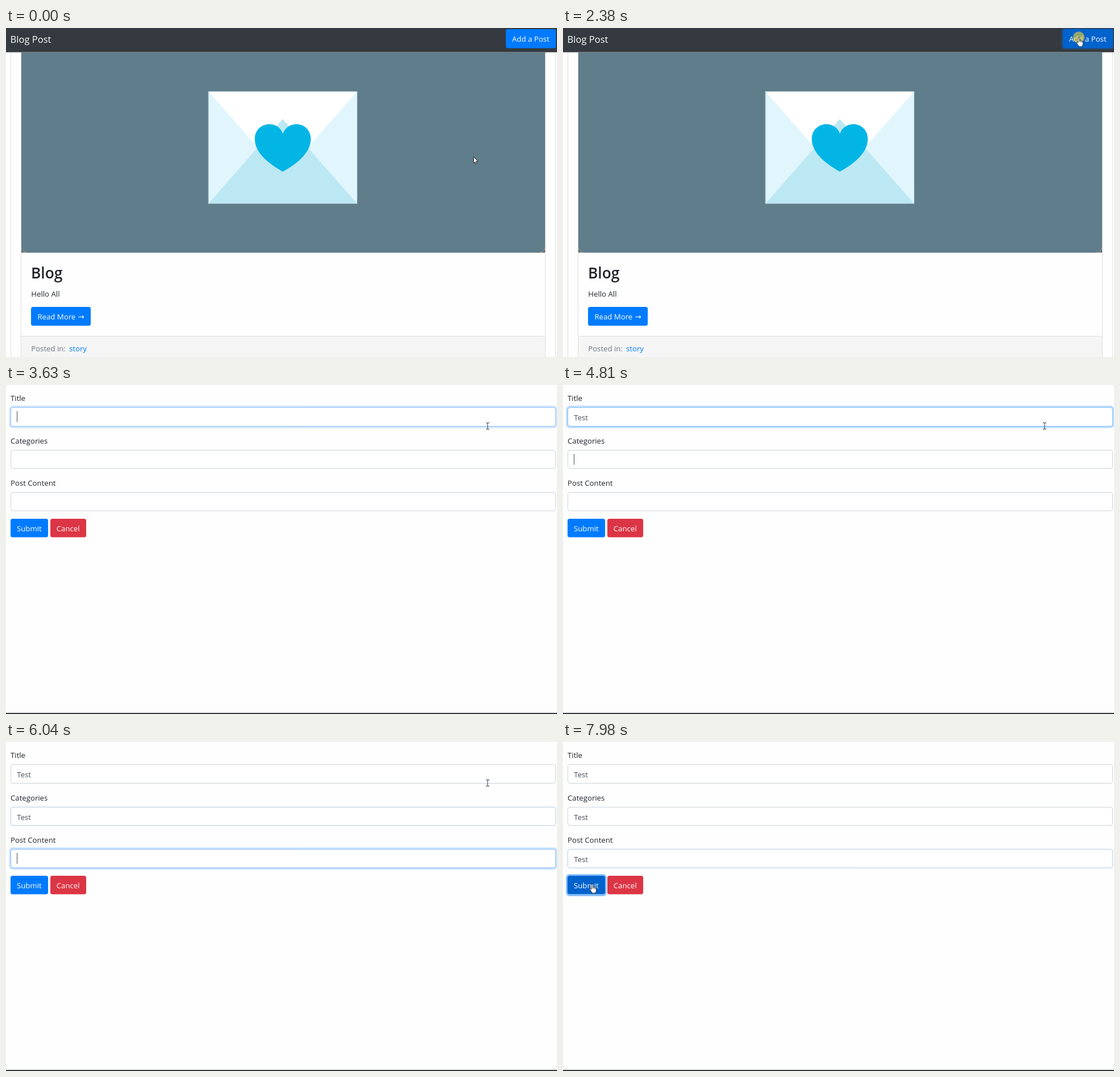
An HTML page that plays this animation: 969 px wide and 578 px high, repeating every 8 s.

```html
<!DOCTYPE html>
<html lang="en">
<head>
<meta charset="utf-8">
<title>Blog post form</title>
<style>
  html, body { margin: 0; width: 100%; height: 100%; overflow: hidden; background: #fefefe; }
  svg { display: block; width: 100%; height: 100%; }
  text { font: 13.2px "Open Sans", "Noto Sans", sans-serif; fill: #212529; white-space: pre; }
  .brand { font-size: 16.5px; fill: #fff; }
  .head { font-size: 26.3px; font-weight: 600; }
  .light { fill: #fff; }
  .value { fill: #495057; }
  .muted { fill: #6c757d; }
  .link { fill: #007bff; }
  .arrow { font-family: "DejaVu Sans", sans-serif; }
  .btn { fill: #007bff; }
  .line { fill: none; stroke: #dfdfdf; }
  .box { fill: #fff; stroke: #ced4da; }
  .ring { fill: none; stroke: #007bff; stroke-width: 2.7; }
</style>
</head>
<body>
<svg viewBox="0 0 969 578" preserveAspectRatio="none">
  <rect width="969" height="578" fill="#fefefe"/>

  <g id="form">
    <g id="fields"></g>
    <rect id="submitRing" class="ring" x="6.7" y="233.7" width="68.6" height="35.6" rx="4.5" stroke-opacity=".5" opacity="0"/>
    <rect id="submit" class="btn" x="8" y="235" width="66" height="32.6" rx="3.5"/>
    <text class="light" x="19" y="256.5">Submit</text>
    <rect x="78" y="235" width="63" height="32.6" rx="3.5" fill="#dc3545"/>
    <text class="light" x="88.8" y="256.5">Cancel</text>
    <rect y="576" width="969" height="2" fill="#343a40"/>
  </g>

  <g id="blog">
    <rect width="969" height="578" fill="#fefefe"/>
    <path class="line" d="M8.5 43V578M966.5 43V578M26.5 43V578M948.5 43V578"/>
    <path d="M27 380H948V394.5H27Z" fill="#56666e"/>
    <path d="M27 43H948V384Q948 394.5 937 394.5H38Q27 394.5 27 384Z" fill="#607d8b"/>
    <path d="M27 384Q27 394.5 38 394.5M948 384Q948 394.5 937 394.5" fill="none" stroke="#a39c92"/>
    <g>
      <rect x="356" y="111.5" width="261.5" height="197" fill="#e1f5fc"/>
      <path d="M356 111.5H617.5L486.75 260Z" fill="#fff"/>
      <path d="M356 308.5H617.5L486.75 160Z" fill="#bce8f3"/>
      <rect x="356" y="111.5" width="261.5" height="197" fill="none" stroke="#a4c4cf"/>
      <path d="M487 252.5C478 247 437.5 226 437.5 195C437.5 178 451 169 463 169C475 169 484 176 487 186C490 176 499 169 511 169C523 169 536 178 536 195C536 226 496 247 487 252.5Z" fill="#03b5e5"/>
    </g>
    <text class="head" x="44" y="439.5">Blog</text>
    <text x="44.3" y="471.5">Hello All</text>
    <rect class="btn" x="44" y="490" width="105" height="33" rx="3.5"/>
    <text class="light" x="55.4" y="512">Read More</text>
    <text class="light arrow" x="126.5" y="512">→</text>
    <rect x="27" y="541" width="921" height="37" fill="#f5f5f5"/>
    <path class="line" d="M27 541.5H948"/>
    <text class="muted" x="44.2" y="567.5">Posted in:</text>
    <text class="link" x="111" y="567.5">story</text>
    <rect width="969" height="42.6" fill="#343a40"/>
    <text class="brand" x="7.6" y="25.7">Blog Post</text>
    <rect id="addRing" class="ring" x="877.7" y=".7" width="90.6" height="35.6" rx="4.5" stroke-opacity=".5" opacity="0"/>
    <rect id="add" class="btn" x="879" y="2" width="88" height="33.4" rx="3.5"/>
    <text class="light" x="890" y="24">Add a Post</text>
  </g>

  <circle id="click" r="10.3" fill="#ffd92e" opacity="0"/>
  <g id="cursor">
    <path id="arrow" d="M.3 .3V11.4L2.8 9.1L4.5 13L6.4 12.2L4.7 8.4H8Z" fill="#fff" stroke="#111" stroke-width=".9"/>
    <path id="hand" d="M-1.2 9.5V1.2Q-1.2 .2 0 .2Q1.3 .2 1.3 1.4V5.2Q3.4 4.6 3.8 5.9Q5.6 5.4 6 6.6Q7.6 6.3 7.6 8V11.5Q7.3 13.3 6.3 14.4V16H-.2V14.6Q-2.2 12.4-3.9 9.6Q-4.5 8.3-3.4 7.9Q-2.4 7.7-1.2 9.5ZM1.3 5.2V8.3M3.8 5.9V8.5M6 6.6V8.8" fill="#fff" stroke="#222" stroke-width=".9"/>
    <path id="beam" d="M-3-5.5H-1Q0-5.5 0-4.5Q0-5.5 1-5.5H3M-3 5.5H-1Q0 5.5 0 4.5Q0 5.5 1 5.5H3M0-4.5V4.5" fill="none" stroke="#333"/>
  </g>
</svg>
<script>
const LOOP = 8000;
const $ = id => document.getElementById(id);

// Hold each value from its time until the next entry.
function hold(el, prop, steps) {
  const frames = steps.map(([t, v]) => ({ offset: t / LOOP, [prop]: v, easing: 'steps(1, end)' }));
  frames.push({ offset: 1, [prop]: steps[steps.length - 1][1] });
  el.animate(frames, { duration: LOOP, iterations: Infinity });
}

function add(parent, tag, attrs, label = '') {
  const el = document.createElementNS('http://www.w3.org/2000/svg', tag);
  for (const k in attrs) el.setAttribute(k, attrs[k]);
  el.textContent = label;
  parent.append(el);
  return el;
}

const fields = [
  { label: 'Title', y: 39.5, h: 33, caret: [3560, 4090], typed: 4340,
    ring: [[0, 0], [3630, .75], [3710, 1], [4870, .2], [4960, 0]] },
  { label: 'Categories', y: 114.5, h: 32, caret: [4810, 5350], typed: 5500,
    ring: [[0, 0], [4870, .75], [4960, 1], [6040, .13], [6110, 0]] },
  { label: 'Post Content', y: 188.5, h: 32.5, caret: [5960, 6510], typed: 6660,
    ring: [[0, 0], [6040, .85], [6110, 1], [7980, .13]] }
];

for (const f of fields) {
  const g = $('fields'), { y, h } = f;
  add(g, 'text', { x: 8, y: y - 11.7 }, f.label);
  add(g, 'rect', { class: 'box', x: 8.5, y, width: 958, height: h, rx: 3.5 });
  const glow = add(g, 'g', { opacity: 0 });
  add(glow, 'rect', { class: 'ring', x: 6.7, y: y - 1.8, width: 961.6, height: h + 3.6, rx: 5, 'stroke-opacity': .25 });
  add(glow, 'rect', { x: 8.5, y, width: 958, height: h, rx: 3.5, fill: 'none', stroke: '#80bdff' });
  const value = add(g, 'text', { class: 'value', x: 19.3, y: y + 22, opacity: 0 }, 'Test');
  const caret = add(g, 'rect', { x: 19, y: y + 6.5, width: 1, height: 19, fill: '#495057', opacity: 0 });
  hold(glow, 'opacity', f.ring);
  hold(value, 'opacity', [[0, 0], [f.typed, 1]]);
  hold(caret, 'opacity', [[0, 0], [f.caret[0], 1], [f.caret[1], 0]]);
}

// Pointer track: [time, x, y, kind]
const track = [[0, 822, 226, 'arrow']];

function kindAt(t, x, y) {
  if (t < 2460) return x > 879 && y < 35 ? 'hand' : 'arrow';
  if (y > 235 && y < 268 && x > 8 && x < 74) return 'hand';
  return fields.some(f => y > f.y && y < f.y + f.h) ? 'beam' : 'arrow';
}

// Eased quadratic path from the last point, sampled in n steps.
function glide(t0, t1, n, cx, cy, x1, y1) {
  const [, x0, y0] = track[track.length - 1];
  for (let i = 1; i <= n; i++) {
    const t = t0 + (t1 - t0) * (n > 1 ? (i - 1) / (n - 1) : 0);
    const k = i / n, u = k * k * (3 - 2 * k), w = 1 - u;
    const x = w * w * x0 + 2 * u * w * cx + u * u * x1;
    const y = w * w * y0 + 2 * u * w * cy + u * u * y1;
    track.push([t, x, y, kindAt(t, x, y)]);
  }
}

glide(70, 620, 8, 850, 135, 882, 63);
glide(770, 1240, 7, 889, 48, 901, 36);
glide(2240, 2240, 1, 904, 26, 907, 16.6);
glide(2620, 3160, 8, 885, 50, 847, 72);
glide(6850, 7580, 11, 60, 368, 60.5, 238.5);
glide(7670, 7830, 3, 55, 244, 51, 249.5);

hold($('cursor'), 'transform', track.map(([t, x, y]) => [t, `translate(${x}px, ${y}px)`]));
for (const kind of ['arrow', 'hand', 'beam'])
  hold($(kind), 'opacity', track.map(p => [p[0], p[3] === kind ? 1 : 0]));

hold($('blog'), 'opacity', [[0, 1], [2460, 0]]);
hold($('add'), 'fill', [[0, '#007bff'], [2240, '#0074f0'], [2310, '#0069d9'], [2380, '#0062cc']]);
hold($('addRing'), 'opacity', [[0, 0], [2380, .5]]);
hold($('click'), 'transform', [[0, 'translate(901.5px, 35.5px)'], [2240, 'translate(907px, 16.5px)']]);
hold($('click'), 'opacity', [[0, 0], [1690, .58], [1840, 0], [2310, .58], [2460, 0]]);

const over = track.find(p => p[0] > 6850 && p[3] === 'hand')[0];
hold($('submit'), 'fill', [[0, '#007bff'], [over, '#0069d9'], [7900, '#0062cc']]);
hold($('submitRing'), 'opacity', [[0, 0], [7980, 1]]);
</script>
</body>
</html>
```
